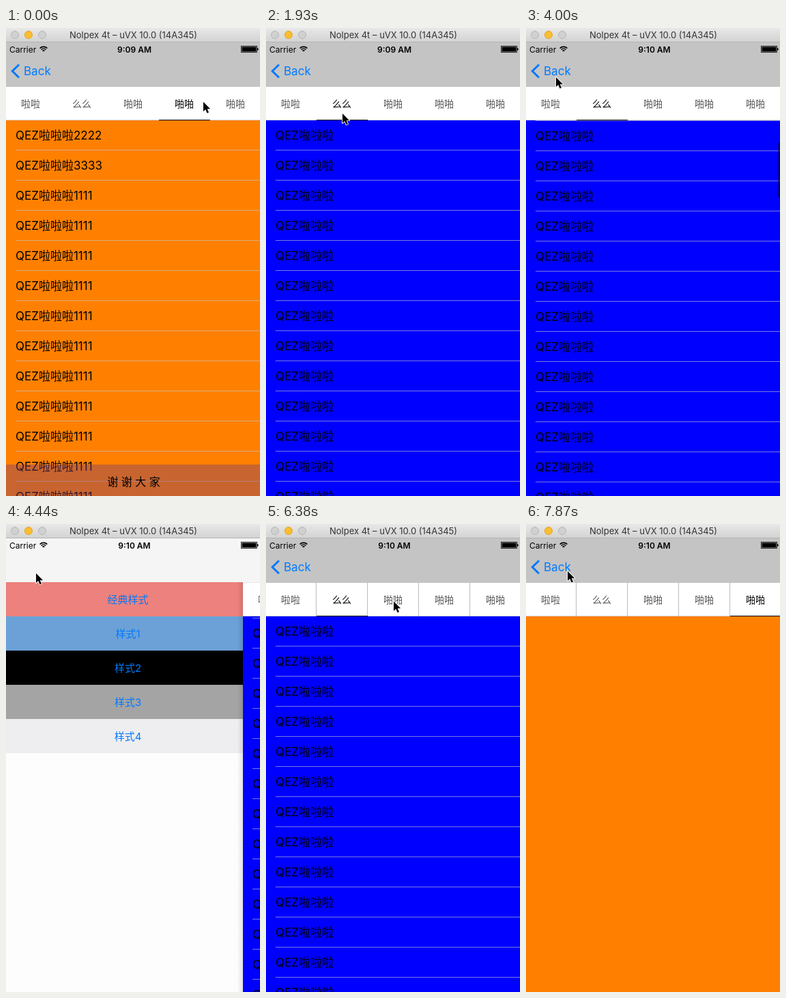
Recreate the animation shown at these times as an HTML page with a canvas. Size 372 by 684 pixels, loop 8 s.

```html
<!DOCTYPE html>
<html lang="zh-CN">
<head>
<meta charset="utf-8">
<title>Tabs</title>
<style>
html, body { margin: 0; width: 100%; height: 100%; overflow: hidden; background: #fff; }
canvas { display: block; width: 372px; height: 684px; }
</style>
</head>
<body>
<canvas id="stage"></canvas>
<script>
const W = 372, H = 684, LOOP = 8000, TICK = 148.4;
const TOP = 135, ROW = 44, TAB = 75, ROWS_HEIGHT = 3650;
const MOVE = 200, SLIDE = 240, FRICTION = 130;
const FONT = 'Inter, "Noto Sans CJK SC", "Noto Sans CJK", sans-serif';
const BLUE = '#007aff';
const NAME = 'QEZ';

const canvas = document.getElementById('stage');
const ratio = window.devicePixelRatio || 1;
canvas.width = W * ratio;
canvas.height = H * ratio;
const ctx = canvas.getContext('2d');

const TABS = ['啦啦', '么么', '啪啪', '啪啪', '啪啪'];
const MENU = [
  ['经典样式', '#ee827e'], ['样式1', '#6ca2d8'], ['样式2', '#000'],
  ['样式3', '#a5a5a5'], ['样式4', '#f0f0f2']
];

// Each visit to a tabbed screen; taps holds the times at which the next tab is chosen
const VISITS = [
  { push: -1000, pop: 330, first: 3, taps: [], footer: true },
  { push: 780, pop: 4060, first: 0, taps: [1660], scrolls: true },
  { push: 5375, pop: LOOP, first: 0, taps: [5690, 6400, 7030, 7330], lines: true }
];

// Finger drags the list until lift, then it glides to rest
const SWIPES = [
  { start: 2230, lift: 2530, rest: 1191 },
  { start: 2930, lift: 3265, rest: 217 }
];

const tabX = i => 36 + i * TAB;

// Pointer stops: arrival time and place
const STOPS = [
  [0, 288, 107],
  [300, 46, 72], [720, 45, 99], [1330, 36, 64], [1690, tabX(1), 124],
  [2230, 180, 560], [2530, 196, 4], [2900, 184, 171], [3265, 178, 592],
  [4000, 43, 71], [5190, 197, 169],
  [5690, tabX(1), 112], [6370, tabX(2), 112], [7030, tabX(3), 112], [7330, tabX(4), 112],
  [7865, 60, 68]
];

function smooth(u) {
  u = Math.min(1, Math.max(0, u));
  return u * u * (3 - 2 * u);
}

function spring(ms) {
  if (ms <= 0) return 0;
  if (ms >= 390) return 1;
  const k = ms * 0.018;
  return 1 - (1 + k) * Math.exp(-k);
}

function pointerAt(t) {
  let [, x, y] = STOPS[0];
  for (const [arrive, nx, ny] of STOPS) {
    const u = smooth((t - arrive) / MOVE + 1);
    x += (nx - x) * u;
    y += (ny - y) * u;
  }
  return { x, y };
}

function scrollAt(t) {
  let offset = 0;
  for (const { start, lift, rest } of SWIPES) {
    if (t < start) break;
    offset += pointerAt(start).y - pointerAt(Math.min(t, lift)).y;
    if (t > lift) offset = rest + (offset - rest) * Math.exp((lift - t) / FRICTION);
  }
  return offset;
}

function box(x, y, w, h, color) {
  ctx.fillStyle = color;
  ctx.fillRect(x, y, w, h);
}

function text(str, x, y, size, color = '#000', align = 'left', weight = 400) {
  ctx.font = `${weight} ${size}px ${FONT}`;
  ctx.textAlign = align;
  ctx.fillStyle = color;
  ctx.fillText(str, x, y);
}

function clipped(x, y, w, h, draw) {
  ctx.save();
  ctx.beginPath();
  ctx.rect(x, y, w, h);
  ctx.clip();
  draw();
  ctx.restore();
}

function list(x, color, offset, label) {
  box(x, TOP, W, H - TOP, color);
  for (let i = Math.floor(offset / ROW); ; i++) {
    const y = TOP + i * ROW - offset;
    if (y > H) break;
    text(label(i), x + 14, y + 28, 17);
    box(x + 14, Math.round(y + 43), W - 14, 1, 'rgba(200,199,204,.6)');
  }
}

function page(index, x, offset) {
  if (index === 0) {
    box(x, TOP, W, H - TOP, '#800080');
    box(x + 30, TOP + 30, 50, 50, '#f00');
  } else if (index === 1) {
    list(x, '#00f', offset, () => NAME + '啦啦啦');
  } else if (index === 3) {
    list(x, '#ff8000', 0, i => NAME + '啦啦啦' + (['2222', '3333'][i] || '1111'));
  } else {
    box(x, TOP, W, H - TOP, '#ff8000');
  }
}

function tabStrip(pos, lines) {
  const shift = -1.5 * Math.min(pos, 1);
  box(0, 85, W, 50, '#fff');
  box(0, 85, W, 1, lines ? '#c2c2c2' : '#e6e6e6');
  box(0, 134, W, 1, '#d4d4d4');
  TABS.forEach((label, i) => {
    const x = i * TAB + shift;
    text(label, x + TAB / 2, 115.5, 14, Math.round(pos) === i ? '#000' : '#555', 'center');
    if (lines && i) box(Math.floor(x), 86, 1, 49, '#bcbcbc');
  });
  box(Math.round(pos * TAB + shift), 134, TAB, 1, '#000');
}

function screen(visit, t, x) {
  const pos = visit.taps.reduce((sum, tap) => sum + smooth((t - tap) / SLIDE), visit.first);
  const offset = visit.scrolls ? scrollAt(t) : 0;
  if (x > 0) {
    const shade = ctx.createLinearGradient(x - 8, 0, x, 0);
    shade.addColorStop(0, 'rgba(0,0,0,0)');
    shade.addColorStop(1, 'rgba(0,0,0,.12)');
    box(x - 8, 85, 8, H - 85, shade);
  }
  ctx.save();
  ctx.translate(x, 0);
  clipped(0, TOP, W, H - TOP, () => {
    for (let i = Math.floor(pos); i <= Math.ceil(pos); i++) page(i, (i - pos) * W, offset);
    if (offset > 0) box(369, TOP + offset / ROWS_HEIGHT * (H - TOP), 3, 80, 'rgba(0,0,0,.45)');
    if (visit.footer) {
      box(0, 638, W, 46, 'rgba(117,58,117,.4)');
      text('谢 谢 大 家', 187, 669, 16, '#000', 'center');
    }
  });
  clipped(0, 85, W, 50, () => tabStrip(pos, visit.lines));
  ctx.restore();
}

function menu(p) {
  const x = -0.3 * W * p;
  box(0, 85, W, H - 85, '#fff');
  MENU.forEach(([label, color], i) => {
    const y = 85 + i * 50;
    box(x, y, W, 50, color);
    text(label, x + W / 2, y + 30.5, 15, BLUE, 'center');
  });
  box(0, 85, W, H - 85, `rgba(0,0,0,${0.1 * p})`);
}

function navBar(x, p) {
  box(0, 21, W, 64, '#f5f5f6');
  const edge = x * 2.4 - 30;
  const grey = ctx.createLinearGradient(edge - 30, 0, edge + 30, 0);
  grey.addColorStop(0, 'rgba(196,196,196,0)');
  grey.addColorStop(1, 'rgb(196,196,196)');
  box(0, 21, W, 65, grey);
  ctx.globalAlpha = Math.pow(p, 5);
  ctx.strokeStyle = BLUE;
  ctx.lineWidth = 3;
  ctx.beginPath();
  ctx.moveTo(19, 53.5);
  ctx.lineTo(9.3, 63);
  ctx.lineTo(19, 72.5);
  ctx.stroke();
  text('Back', 26 + (1 - p) * 142, 69, 17, BLUE);
  ctx.globalAlpha = 1;
}

function disc(x, fill, line) {
  ctx.beginPath();
  ctx.arc(x, 10, 5.5, 0, 7);
  ctx.fillStyle = fill;
  ctx.fill();
  ctx.strokeStyle = line;
  ctx.lineWidth = 1;
  ctx.stroke();
}

function titleBar() {
  const g = ctx.createLinearGradient(0, 0, 0, 20);
  g.addColorStop(0, '#e8e8e8');
  g.addColorStop(1, '#d3d3d3');
  box(0, 0, W, 20, g);
  box(0, 20, W, 1, '#b4b4b4');
  disc(13, '#d0d0d0', '#b6b6b6');
  disc(33, '#fdbd2e', '#dfa029');
  disc(53, '#d0d0d0', '#b6b6b6');
  text('Nolpex 4t – uVX 10.0 (14A345)', 186.5, 15, 13, '#333', 'center');
}

function statusBar(t) {
  text('Carrier', 5, 35.5, 12);
  text(t < 3700 ? '9:09 AM' : '9:10 AM', 188, 35.5, 12, '#000', 'center', 600);
  ctx.strokeStyle = '#000';
  ctx.lineWidth = 1.6;
  for (let r = 2; r < 9; r += 2.8) {
    ctx.beginPath();
    ctx.arc(55, 35, r, -Math.PI * 0.75, -Math.PI * 0.25);
    ctx.stroke();
  }
  ctx.lineWidth = 0.8;
  ctx.strokeRect(344.5, 26.5, 23, 9);
  box(345.5, 27.5, 21, 7, '#000');
  box(368, 29.5, 1.5, 3, '#000');
}

function drawPointer({ x, y }) {
  ctx.save();
  ctx.translate(x, y);
  ctx.beginPath();
  [[1, 1], [1, 15], [4.2, 12], [6.6, 17.4], [9, 16.3], [6.7, 11.2], [11.2, 11.2]]
    .forEach(p => ctx.lineTo(...p));
  ctx.closePath();
  ctx.lineJoin = 'round';
  ctx.lineWidth = 1.8;
  ctx.strokeStyle = '#fff';
  ctx.stroke();
  ctx.fillStyle = '#000';
  ctx.fill();
  ctx.restore();
}

function draw(t) {
  ctx.setTransform(ratio, 0, 0, ratio, 0, 0);
  const visit = VISITS.filter(v => t >= v.push).pop();
  const p = spring(t - visit.push) * (1 - spring(t - visit.pop));
  const x = W * (1 - p);
  if (p < 1) menu(p);
  if (p > 0) screen(visit, t, x);
  navBar(x, p);
  titleBar();
  statusBar(t);
  drawPointer(pointerAt(t));
}

// Time advances in coarse ticks, like a low-rate screen recording
function loop() {
  const t = performance.now() % LOOP;
  draw(Math.floor((t + 9) / TICK) * TICK);
  requestAnimationFrame(loop);
}
loop();
</script>
</body>
</html>
```
